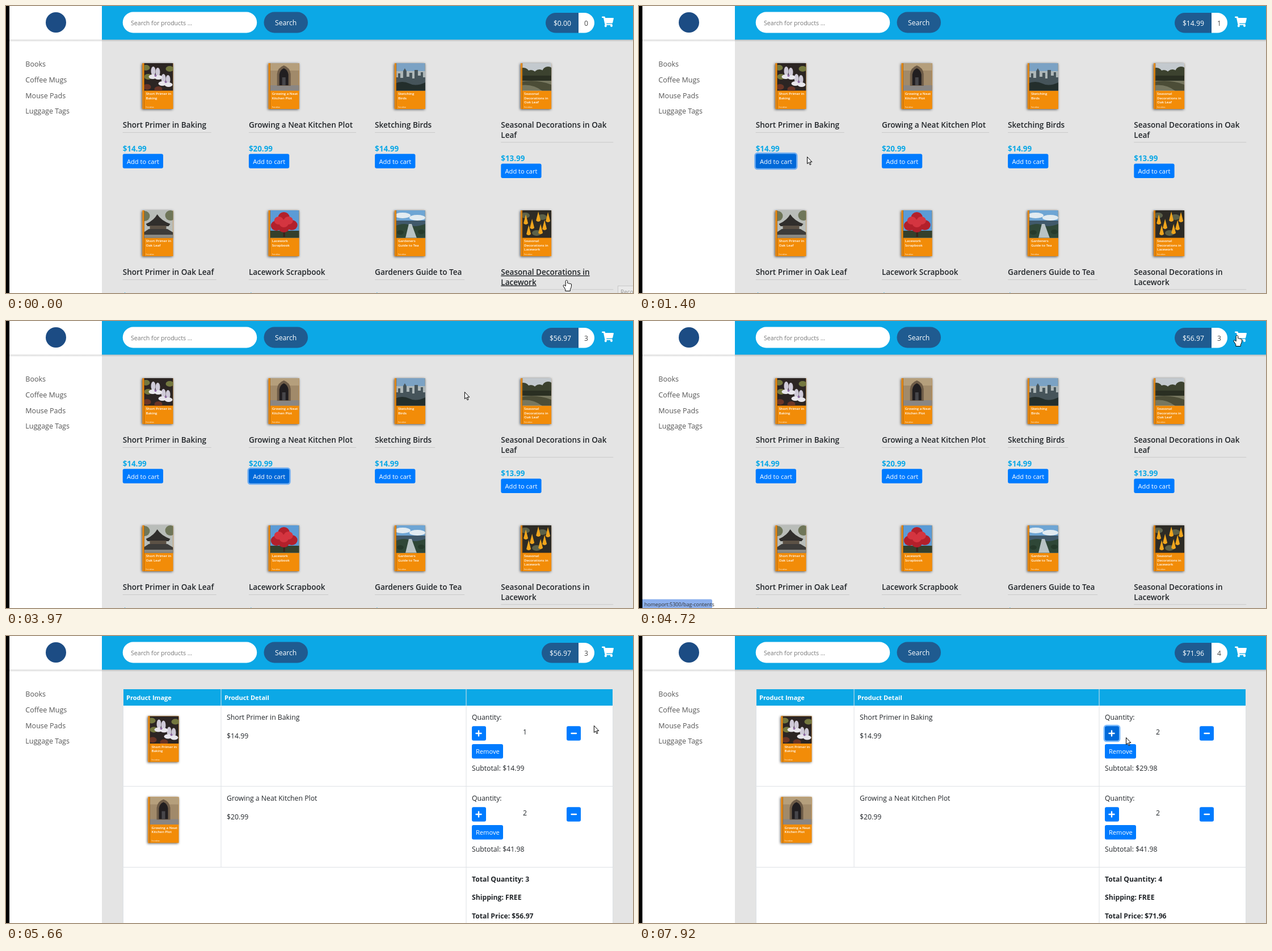
An HTML page that plays this animation: 1105x507 px, repeating every 7.99 s.

```html
<!DOCTYPE html>
<html lang="en">
<head>
<meta charset="utf-8">
<title>Shop</title>
<style>
html, body { margin: 0; width: 100%; height: 100%; overflow: hidden; background: #e4e4e4; }
svg { display: block; width: 100%; height: 100%; font-family: "Open Sans", "Noto Sans", sans-serif; }
.btn rect { fill: #007bff; }
.btn.hover rect, .btn.focus rect { fill: #0069d9; }
.btn.focus rect { stroke: rgba(0, 123, 255, .5); stroke-width: 5; paint-order: stroke; }
.title.hover text { text-decoration: underline; }
.book { filter: drop-shadow(-1px 1px 2px rgba(0, 0, 0, .65)); }
</style>
</head>
<body>
<script>
const LOOP = 7990, BLUE = '#0ca8e6', NAVY = '#1f5b90', DARK = '#212529';
const hits = [];

// ---- markup helpers
const text = (x, y, s, size = 12.25, fill = DARK, more = '') =>
  `<text x="${x}" y="${y}" font-size="${size}" fill="${fill}" ${more}>${s}</text>`;
const rect = (x, y, w, h, fill, more = '') =>
  `<rect x="${x}" y="${y}" width="${w}" height="${h}" fill="${fill}" ${more}/>`;
const path = (d, fill, more = '') => `<path d="${d}" fill="${fill}" ${more}/>`;
const oval = (x, y, rx, ry, fill) => `<ellipse cx="${x}" cy="${y}" rx="${rx}" ry="${ry}" fill="${fill}"/>`;
const ovals = (rx, ry, fill, ...pts) => pts.map(([x, y]) => oval(x, y, rx, ry, fill)).join('');
const bold = 'font-weight="700"', semi = 'font-weight="600"', middle = 'text-anchor="middle"';

function button(id, page, x, y, w, inner) {
  hits.push({ id, page, x, y, w, h: 25.5 });
  return `<g id="${id}" class="btn">${rect(x, y, w, 25.5, '', 'rx="3"')}${inner}</g>`;
}

// ---- cover pictures, 54 x 49
const pictures = [
  rect(0, 0, 54, 49, '#2c2523') + ovals(7, 5, '#74783f', [6, 8], [10, 24], [48, 10]) +
    ovals(7, 5, '#6b3526', [8, 42], [28, 46]) +
    ovals(4, 8, '#cfcad8', [19, 14], [27, 16], [37, 27], [45, 29]) +
    ovals(7, 4, '#e8e6ec', [18, 24], [28, 25], [35, 36], [46, 38]) + ovals(2, 2, '#8f6aa5', [23, 22], [41, 33]),
  rect(0, 0, 54, 49, '#a18a6a') + rect(0, 0, 54, 13, '#b59f7c') + rect(0, 39, 54, 10, '#8a8683') +
    path('M15 40V19Q16 8 27 4Q38 8 39 19V40z', '#6e5c48') +
    path('M19 39V20Q20 12 27 9Q34 12 35 20V39z', '#211e20') + rect(24, 25, 6, 14, '#47464a'),
  rect(0, 0, 54, 49, '#7ba2c4') + rect(0, 14, 54, 14, '#aeb7b8') +
    path('M0 49V25H6V18H10V26H15V14L18 9L21 14V24H26V17H31V27H35V12H41V22H46V16H50V25H54V49z', '#46545a') +
    path('M0 49V36Q14 30 26 36T54 34V49z', '#232e2c'),
  rect(0, 0, 54, 49, '#c3c9ce') + ovals(10, 9, '#3c422f', [5, 17], [18, 21], [33, 20], [48, 15]) +
    rect(0, 22, 54, 9, '#2a2f22') + rect(0, 31, 54, 18, '#77775f') + path('M0 33Q28 28 54 38V49H38Q22 36 0 39z', '#4c4d37'),
  rect(0, 0, 54, 49, '#b9bdb9') + ovals(9, 9, '#6f7659', [4, 10], [49, 9]) +
    path('M6 24Q20 18 26 7Q33 18 49 24L46 28H9z', '#302e2c') + rect(13, 27, 29, 7, '#5c5145') +
    path('M2 39L11 33H44L54 39V49H2z', '#3d3c3a') + rect(0, 43, 54, 6, '#8b8a83'),
  rect(0, 0, 54, 49, '#5b9bd6') + rect(0, 36, 54, 13, '#34402c') + rect(26, 32, 3, 15, '#39211c') +
    ovals(10, 9, '#b3202b', [14, 27], [27, 12], [41, 26], [27, 30]) + ovals(8, 7, '#d43540', [18, 18], [35, 18], [27, 23]),
  rect(0, 0, 54, 49, '#6ea5d4') + ovals(14, 5, '#e2ebf1', [14, 9], [40, 13]) + rect(0, 18, 54, 31, '#40596a') +
    path('M0 28Q16 21 26 26T54 24V49H0z', '#2f4737') + path('M25 24H30L39 49H19z', '#b8c3c4') + ovals(6, 4, '#253a2b', [10, 39], [47, 38]),
  rect(0, 0, 54, 49, '#2d2b25') + ovals(8, 5, '#5d6249', [8, 9], [38, 12], [28, 40]) +
    [[9, 14], [20, 22], [31, 9], [42, 24], [14, 33], [35, 31], [48, 10]].map(([x, y]) =>
      path(`M${x} ${y - 7}L${x + 4} ${y + 9}Q${x} ${y + 13} ${x - 4} ${y + 9}z`, '#f0a51c')).join('')
];

// title lines, cover lines, rule width
const products = [
  [['Short Primer in Baking'], ['Short Primer in', 'Baking'], 156, '$14.99'],
  [['Growing a Neat Kitchen Plot'], ['Growing a Neat', 'Kitchen Plot'], 189, '$20.99'],
  [['Sketching Birds'], ['Sketching', 'Birds'], 106, '$14.99'],
  [['Seasonal Decorations in Oak', 'Leaf'], ['Seasonal', 'Decorations in', 'Oak Leaf'], 198, '$13.99'],
  [['Short Primer in Oak Leaf'], ['Short Primer in', 'Oak Leaf'], 165, '$18.99'],
  [['Lacework Scrapbook'], ['Lacework', 'Scrapbook'], 140, '$23.99'],
  [['Gardeners Guide to Tea'], ['Gardeners', 'Guide to Tea'], 158, '$14.99'],
  [['Seasonal Decorations in', 'Lacework'], ['Seasonal', 'Decorations in', 'Lacework'], 198, '$16.99']
];

const book = (i, x, y) => `<g class="book" transform="translate(${x} ${y})">` +
  rect(0, 0, 54, 81, '#f28c08') + `<g clip-path="url(#photo)">${pictures[i]}</g>` +
  rect(0, 0, 2.5, 81, '#e98a14') + rect(2.5, 0, .8, 81, '#a9620a') +
  products[i][1].map((s, n) => text(6, 56 + n * 7.6, s, 6.1, '#fff', semi)).join('') +
  text(6, 78.5, 'First edition', 2.6, '#fff') + '</g>';

function card(i) {
  const [lines, , rule, price] = products[i];
  const x = 205.7 + (i % 4) * 222.2, y = i < 4 ? 0 : 260, drop = (lines.length - 1) * 17.3;
  hits.push({ id: 't' + i, page: 'shop', x, y: y + 200, w: 198, h: 24 + drop });
  return book(i, x + 34.8, y + 101) +
    `<g id="t${i}" class="title">${lines.map((s, n) => text(x, y + 215 + n * 17.7, s, 13.56, DARK, semi)).join('')}</g>` +
    rect(x, y + 223 + drop, rule, 1, '#c9c9c9') +
    text(x, y + 257 + drop, price, 13.4, BLUE, bold) +
    button('b' + i, 'shop', x, y + 261.3 + drop, 71.3, text(x + 7.3, y + 278.6 + drop, 'Add to cart', 11.1, '#fff'));
}

function cartRow(i, qty, subtotal) {
  const y = i * 143;
  const sign = d => `<path d="${d}" stroke="#fff" stroke-width="2.4" stroke-linecap="round"/>`;
  return book(i, 250.5, y + 141.5) + text(389, y + 148, products[i][0][0]) + text(389, y + 180.5, products[i][3]) +
    text(821, y + 148, 'Quantity:') +
    button('plus' + i, 'cart', 821, y + 159.3, 25, sign(`M828.5 ${y + 172}h9m-4.5-4.5v9`)) +
    text(914.5, y + 174, qty, 12.25, DARK, `id="qty${i}" ${middle}`) +
    button('minus' + i, 'cart', 988, y + 159.3, 25, sign(`M996.5 ${y + 172}h8.5`)) +
    button('remove' + i, 'cart', 821, y + 191, 55, text(828, y + 208, 'Remove', 11.1, '#fff')) +
    text(821, y + 238, subtotal, 12.25, DARK, `id="sub${i}"`) +
    rect(206, y + 265, 864, 1, '#dee2e6');
}

hits.push({ id: 'trolley', x: 1047, y: 17, w: 25, h: 22 });

document.body.innerHTML = `<svg viewBox="0 0 1105 507">
<defs>
  <clipPath id="photo"><rect width="54" height="48.5"/></clipPath>
  <linearGradient id="shade" x2="0" y2="1"><stop stop-opacity=".16"/><stop offset="1" stop-opacity="0"/></linearGradient>
</defs>
${rect(0, 0, 1105, 507, '#e4e4e4')}${rect(0, 0, 6, 507, '#000')}${rect(6, 0, 163, 507, '#fff')}
${rect(169, 0, 936, 59.5, BLUE)}${rect(6, 59.5, 1099, 4, 'url(#shade)')}
${oval(88, 29, 18, 18, '#1c4c84')}
${['Books', 'Coffee Mugs', 'Mouse Pads', 'Luggage Tags'].map((s, i) => text(34.3, 107 + i * 27.8, s, 12.5, '#555')).join('')}
${rect(205.7, 10.5, 236.5, 37, '#fff', 'rx="18.5"')}${text(220, 33.5, 'Search for products ...', 10.6, '#777')}
${rect(454.5, 10.5, 77.5, 37, NAVY, 'rx="18.5"')}${text(493.2, 34, 'Search', 12.2, '#fff', middle)}
<path id="pill" fill="${NAVY}"/>${path('M1009 12h10a18 17.8 0 0 1 0 35.6h-10z', '#fff')}
${text(996, 34.8, '', 12.2, '#fff', 'id="total" text-anchor="end"')}
${text(1022.5, 34.8, '', 12.2, '#444', `id="count" ${middle}`)}
${path('M1051 18.5h3.7q.9 0 1.1.8l.3 1.7h13.8q1.3 0 1 1.2l-1.7 7.4q-.2.9-1.1.9h-10l.3 1.2h9.4q1 0 .8 1l-.2.8a2 2 0 1 1-3 .3h-7.2a2 2 0 1 1-2.6-.2L1053 21h-2q-.9 0-.9-.9v-.8q0-.8.9-.8z', '#fff')}
<g id="shop">${products.map((_, i) => card(i)).join('')}</g>
<g id="cart">
  ${rect(206, 94, 864, 420, '#fff')}${rect(206, 94, 864, 29, BLUE)}
  ${text(212, 113, 'Product Image', 11, '#fff', bold)}${text(385, 113, 'Product Detail', 11, '#fff', bold)}
  ${rect(206, 94, 1, 420, '#dee2e6')}${rect(378.5, 94, 1, 314, '#dee2e6')}
  ${rect(810.5, 94, 1, 420, '#dee2e6')}${rect(1069, 94, 1, 420, '#dee2e6')}
  ${cartRow(0, 1, '')}${cartRow(1, 2, 'Subtotal: $41.98')}
  ${text(821, 433.8, '', 12.2, DARK, `id="sumCount" ${bold}`)}
  ${text(821, 466.3, 'Shipping: FREE', 12.2, DARK, bold)}
  ${text(821, 499, '', 12.2, DARK, `id="sumPrice" ${bold}`)}
</g>
<g id="tip">${rect(1078.5, 494.5, 40, 20, '#e9e9e9', 'stroke="#c8c8c8"')}${text(1083, 509, 'Reco', 10, '#999')}</g>
<g id="status">${path('M6 491.5h120q3 0 3 3V507H6z', '#8cb0ee')}${text(9.5, 503.5, 'homeport:5300/bag-contents', 9, '#333')}</g>
<g id="pointer">
  <circle id="click" cx="-.5" cy="2" r="10" fill="rgba(160,190,55,.68)"/>
  <g fill="#fff" stroke="#000" stroke-linejoin="round">
    <path id="hand" d="M0 .5C-1.3.5-1.8 1.4-1.8 2.4V11L-3.4 9.4C-4.4 8.5-6 8.9-6 10.2C-6 11 -5.5 11.4-5.1 12L-2.2 16.5V19.5H6.3V16.5C7.7 14.4 8.5 12.5 8.5 9V8C8.5 6.3 6.6 6 5.9 7.2C5.7 5.6 3.9 5.4 3.4 6.6C3.1 5.5 2.3 5.2 1.7 5.6V2.4C1.7 1.4 1.2.5 0 .5z"/>
    <path id="arrow" d="M.5.5V12.7L3.3 10.2L5.2 14.6L7.1 13.8L5.2 9.5H8.9z"/>
  </g>
</g>
</svg>`;

// ---- timeline
const track = [
  [0, 988, 484], [20, 988, 484], [670, 243, 268], [1270, 243, 268], [1400, 296, 266], [1750, 452, 267],
  [1950, 465, 267], [3440, 465, 267], [4250, 1038, 30], [4420, 1054, 25], [5130, 1054, 25], [5320, 1068, 45],
  [5940, 982, 214], [6430, 843, 192], [6770, 828, 174], [6840, 828, 173], [7040, 828, 172], [7710, 828, 172],
  [7920, 858, 179], [LOOP, 858, 179]
];
const totals = [[0, '$0.00', 0], [1140, '$14.99', 1], [2350, '$35.98', 2], [3020, '$56.97', 3], [7510, '$71.96', 4]];
const focuses = [[0, ''], [1000, 'b0'], [2210, 'b1'], [4460, ''], [7370, 'plus0']];
const clicks = [1000, 2210, 2880, 4460, 7370];

const $ = id => document.getElementById(id);
const show = (id, on) => $(id).style.display = on ? '' : 'none';
const latest = (steps, t) => steps.filter(s => s[0] <= t).pop();

// slope at key i for coordinate k; zero at rests and turning points
function slope(i, k) {
  const a = track[i - 1], b = track[i], c = track[i + 1];
  if (!a || !c || (b[k] - a[k]) * (c[k] - b[k]) <= 0) return 0;
  return (c[k] - a[k]) / (c[0] - a[0]);
}

function pointAt(t) {
  const i = track.findIndex(p => p[0] > t) - 1, a = track[i], b = track[i + 1];
  const d = b[0] - a[0], u = (t - a[0]) / d, v = 1 - u;
  return [1, 2].map(k => v * v * (1 + 2 * u) * a[k] + u * u * (3 - 2 * u) * b[k] +
    d * u * v * (v * slope(i, k) - u * slope(i + 1, k)));
}

function draw(t) {
  const page = t < 4790 ? 'shop' : 'cart';
  const [x, y] = pointAt(t), [, total, count] = latest(totals, t), focus = latest(focuses, t)[1];
  const over = hits.find(h => (!h.page || h.page === page) &&
    x >= h.x && x <= h.x + h.w && y >= h.y && y <= h.y + h.h);

  show('shop', page === 'shop');
  show('cart', page === 'cart');
  show('tip', t < 70);
  show('status', t >= 4320 && t < 5180);
  show('hand', over);
  show('arrow', !over);
  show('click', clicks.some(c => t >= c && t < c + 210));
  $('pointer').setAttribute('transform', `translate(${x} ${y})`);
  for (const h of hits) {
    const el = $(h.id);
    if (!el) continue;
    el.classList.toggle('hover', h === over);
    el.classList.toggle('focus', h.id === focus);
  }

  $('pill').setAttribute('d', `M1009 12H${count ? 962 : 969}a18 17.8 0 0 0 0 35.6H1009z`);
  $('total').textContent = total;
  $('count').textContent = count;
  $('qty0').textContent = count > 3 ? 2 : 1;
  $('sub0').textContent = 'Subtotal: ' + (count > 3 ? '$29.98' : '$14.99');
  $('sumCount').textContent = 'Total Quantity: ' + count;
  $('sumPrice').textContent = 'Total Price: ' + total;
}

let start;
function tick(now) {
  start ??= now;
  draw((now - start) % LOOP);
  requestAnimationFrame(tick);
}
draw(0);
requestAnimationFrame(tick);
</script>
</body>
</html>
```
